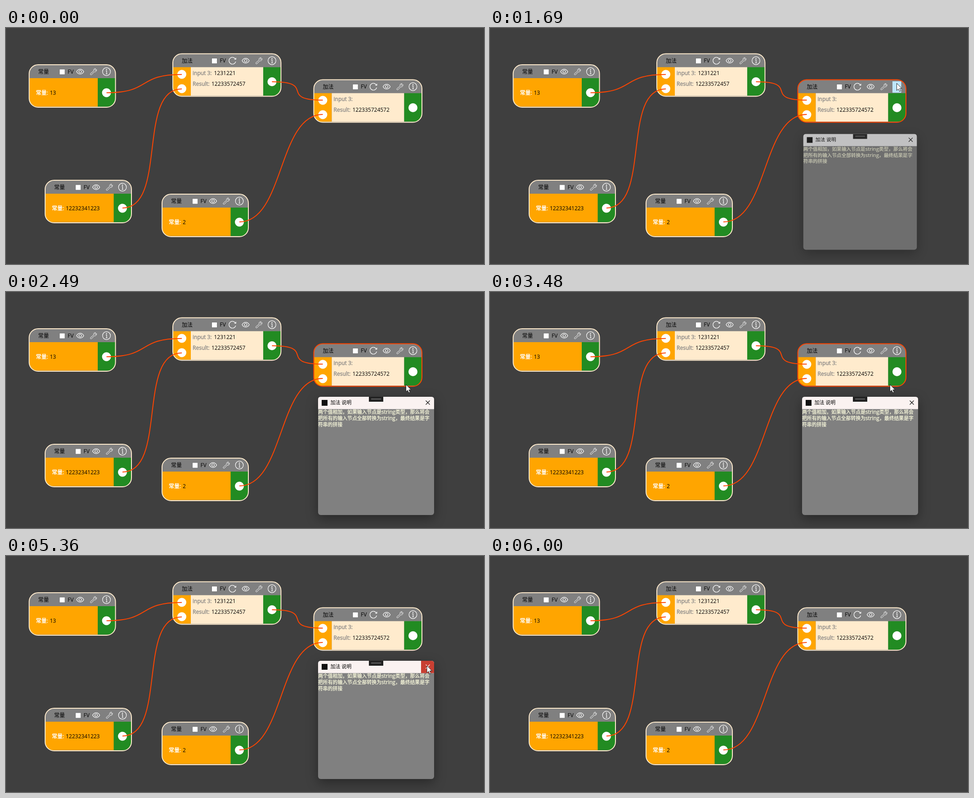
Animation, 1063 px wide and 527 px high, one loop 6330 ms. Source, as an HTML page:

```html
<!DOCTYPE html>
<html lang="zh-CN">
<head>
<meta charset="utf-8">
<title>节点编辑器</title>
<style>
  html, body { margin: 0; width: 100%; height: 100%; overflow: hidden; background: #3f3f3f; }
  svg { display: block; width: 100vw; height: 100vh; }
  text { font: 12px "Open Sans", "Noto Sans CJK SC", sans-serif; white-space: pre; }
  .icon { fill: none; stroke: #fff; stroke-width: 1.2; stroke-linejoin: round; }
  #wrench { stroke-width: 1; }
  .frame { fill: none; stroke: #ffebcd; stroke-width: 2; }
  .hover .frame { stroke: #ff4500; }
  .wire { fill: none; stroke: #ff4500; stroke-width: 2; }
  .name { fill: #808080; stroke: #808080; stroke-width: .3; }
  .label { fill: #fff; font-weight: 600; }
  #dialog { filter: drop-shadow(0 8px 13px rgba(0, 0, 0, .36)); }
  #dialog .title { font-size: 11px; }
  #dialog .note { font-size: 10.85px; fill: #ffffe0; stroke: #ffffe0; stroke-width: .25; }
  #dialog .note tspan { font-size: 11.7px; }
</style>
</head>
<body>
<svg viewBox="0 0 1063 527" preserveAspectRatio="none">
  <defs>
    <g id="info" class="icon"><circle r="8.8"/><path d="M-1.4 -1.6H.3V5M-1.6 5H2"/><circle cy="-4.6" r=".6"/></g>
    <g id="eye" class="icon"><path d="M-8 0C-4.3 -7.2 4.3 -7.2 8 0C4.3 7.2 -4.3 7.2 -8 0Z"/><circle r="3"/></g>
    <path id="wrench" class="icon" d="M-6.5 4.3L.4 -1.6C-.6 -5 2 -7.6 5 -6.6L2.7 -4.1L4.2 -2.5L6.8 -4.8C7.6 -1.5 5 1.2 2 .3L-4.3 6.8C-6 8 -8 6 -6.5 4.3Z"/>
    <path id="redo" class="icon" d="M6.8 -3.4A7.6 7.6 0 1 0 7.4 2M7.8 -6.6V-3H4"/>
  </defs>
  <g id="nodes"></g>
  <g id="wires"></g>
  <g id="dialog">
    <rect x="694" y="234" width="258" height="264" rx="6" fill="#808080"/>
    <path id="bar" d="M694 261.5V240Q694 234 700 234H946Q952 234 952 240V261.5Z"/>
    <rect x="702" y="241" width="13" height="13" fill="#111"/>
    <text class="title" x="721.5" y="251">加法 说明</text>
    <path id="close" d="M923 261.5V234H946Q952 234 952 240V261.5Z"/>
    <path id="cross" d="M933.5 242.5l9 9m0 -9l-9 9" fill="none" stroke-width="1.2"/>
    <g id="grip"><rect x="807" y="234" width="32" height="11" fill="#202020"/><rect x="812" y="237.5" width="22" height="3" fill="#555"/></g>
    <text class="note" x="694" y="272">两个值相加，如果输入节点是<tspan>string</tspan>类型，那么将会</text>
    <text class="note" x="694" y="286">把所有的输入节点全部转换为<tspan>string</tspan>，最终结果是字</text>
    <text class="note" x="694" y="300">符串的拼接</text>
  </g>
  <path id="cursor" d="M0 0V16L3.7 12.7L6.3 18.3L8.9 17.1L6.4 11.6H11.3Z" fill="#fff" stroke="#111" stroke-width=".9"/>
</svg>
<script>
const $ = id => document.getElementById(id);
const H = 97, BODY = 63.5;
const rect = (x, y, w, h, fill) => `<rect x="${x}" y="${y}" width="${w}" height="${h}" fill="${fill}"/>`;
const text = (x, y, s, cls = '') => `<text x="${x}" y="${y}" class="${cls}">${s}</text>`;
const port = (x, y) => `<circle cx="${x}" cy="${y}" r="10" fill="#fff"/>`;
const icon = (id, x) => `<use href="#${id}" x="${x}" y="16.5"/>`;

let clips = 0;
function node(x, y, w, title, check, body, extra = '') {
  const clip = 'clip' + clips++;
  return `<g transform="translate(${x} ${y})">
    <clipPath id="${clip}"><rect x="1" y="1" width="${w - 2}" height="${H - 2}" rx="20"/></clipPath>
    <g clip-path="url(#${clip})">
      ${rect(0, 0, w, H, '#808080')}${body}
      ${rect(w - 40.5, 31, 40.5, BODY, '#228b22')}
    </g>
    ${text(21, 21, title)}
    <rect x="${check}" y="11" width="12" height="12" fill="#fff" stroke="#6c6c6c" stroke-width=".8"/>
    ${text(check + 18, 20.5, 'FV')}
    ${icon('eye', w - 79.5)}${icon('wrench', w - 50)}
    <g class="info">${icon('info', w - 21)}</g>${extra}
    ${port(w - 21, 63.5)}
    <rect class="frame" x="1" y="1" width="${w - 2}" height="${H - 2}" rx="20"/>
  </g>`;
}

const constant = (x, y, value) => node(x, y, 194, '常量', 68.5,
  rect(0, 31, 154, BODY, '#ffa500'),
  text(16, 68, '常量:', 'label') + text(47, 68, value));

const adder = (x, y, input, result) => node(x, y, 242.5, '加法', 87.5,
  rect(0, 31, 41, BODY, '#ffa500') + rect(41, 31, 161, BODY, '#ffebcd'),
  icon('redo', 133.5) + port(21, 47) + port(21, 79) +
  text(45, 48, 'input 3:', 'name') + text(92.5, 48, input) +
  text(45, 72.5, 'Result:', 'name') + text(87, 72.5, result) +
  '<rect class="glow" x="211.5" y="4.5" width="19.5" height="25.5" fill="#bee6fd" display="none"/>');

const wire = (x1, y1, x2, y2) =>
  `<path class="wire" d="M${x1} ${y1}C${x1 + 100} ${y1} ${x2 - 100} ${y2} ${x2} ${y2}"/>`;

$('nodes').innerHTML =
  constant(50.5, 81, '13') + constant(86, 339, '12232341223') + constant(346, 370, '2') +
  adder(370, 56.5, '1231221', '12233572457') + adder(683.5, 114.5, '', '122335724572');
$('wires').innerHTML =
  wire(223.5, 144.5, 391, 103.7) + wire(259, 402, 391, 136) +
  wire(591.5, 120, 704.5, 161) + wire(519, 433, 704.5, 193);

const sum = $('nodes').lastElementChild;
const glow = sum.querySelector('.glow'), info = sum.querySelector('.info');

const LOOP = 6330, STEP = 70;
const bursts = [0, 190, 1620, 1820, 2220, 2490, 3480, 4500, 5360, 5580];
const linear = u => u;
const easeOut = u => 1 - (1 - u) ** 2;
const easeIn = u => u ** 1.6;
const smooth = u => u * u * (3 - 2 * u);

// Pointer moves: start, end, hide time, ease, then a quadratic curve
const moves = [
  [190, 820, 3480, easeOut, [1015, 467], [950, 190], [904.5, 123.5]],
  [1960, 2220, 3480, smooth, [904.5, 123.5], [903, 165], [889, 204]],
  [2420, 2490, 3480, smooth, [889, 204], [889, 205], [889.5, 206.7]],
  [3480, 3690, 3750, easeIn, [889.5, 206.7], [915, 275], [969, 394]],
  [4500, 4920, 5580, easeOut, [1037, 523.5], [1000, 330], [936, 245]],
  [5580, 5720, 5790, linear, [942, 254], [1055, 428], [1054, 502]]
];

function pointer(t) {
  const m = moves.filter(m => m[0] <= t).pop();
  if (!m || t >= m[2]) return null;
  const [start, end, , ease, a, b, c] = m;
  const u = ease(Math.min(1, (t - start) / (end - start))), v = 1 - u;
  return [0, 1].map(i => v * v * a[i] + 2 * u * v * b[i] + u * u * c[i]);
}

const inside = (p, x, y, w, h) => !!p && p[0] >= x && p[0] <= x + w && p[1] >= y && p[1] <= y + h;
const show = (el, on) => el.setAttribute('display', on ? 'inline' : 'none');
const clamp = u => Math.max(0, Math.min(1, u));

function draw(time) {
  const start = bursts.filter(b => b <= time).pop();
  const t = start + Math.floor((time - start) / STEP) * STEP;

  const p = pointer(t);
  show($('cursor'), p);
  if (p) $('cursor').setAttribute('transform', `translate(${p[0]} ${p[1]})`);

  sum.classList.toggle('hover', inside(p, 683.5, 114.5, 242.5, H));
  const hot = inside(p, 895, 119, 19.5, 25.5);
  show(glow, hot);
  show(info, !hot);

  const closing = t >= 5580;
  const gone = clamp((t - 5510) / 290);
  const shown = easeOut(clamp((t - 1570) / 250));
  const scale = closing ? 1 - .05 * gone : .92 + .08 * shown;
  const [cx, cy] = closing ? [821.5, 365.5] : [823, 366];
  const dialog = $('dialog');
  show(dialog, t >= 1620 && gone < 1);
  dialog.setAttribute('opacity', closing ? 1 - gone : shown);
  dialog.setAttribute('transform', `translate(${cx} ${cy}) scale(${scale}) translate(-823 -366)`);
  $('bar').setAttribute('fill', t < 2030 ? '#f2f2f3' : closing ? '#f9fcfc' : '#faf2f1');

  const red = closing || inside(p, 923, 234, 29, 28);
  $('close').setAttribute('fill', !red ? 'none' : t >= 5360 && !closing ? '#c83f32' : '#c42b1c');
  $('cross').setAttribute('stroke', red ? '#fff' : '#111');
  show($('cross'), !closing);
  show($('grip'), !closing);
}

function tick() {
  draw(performance.now() % LOOP);
  requestAnimationFrame(tick);
}
tick();
</script>
</body>
</html>
```
